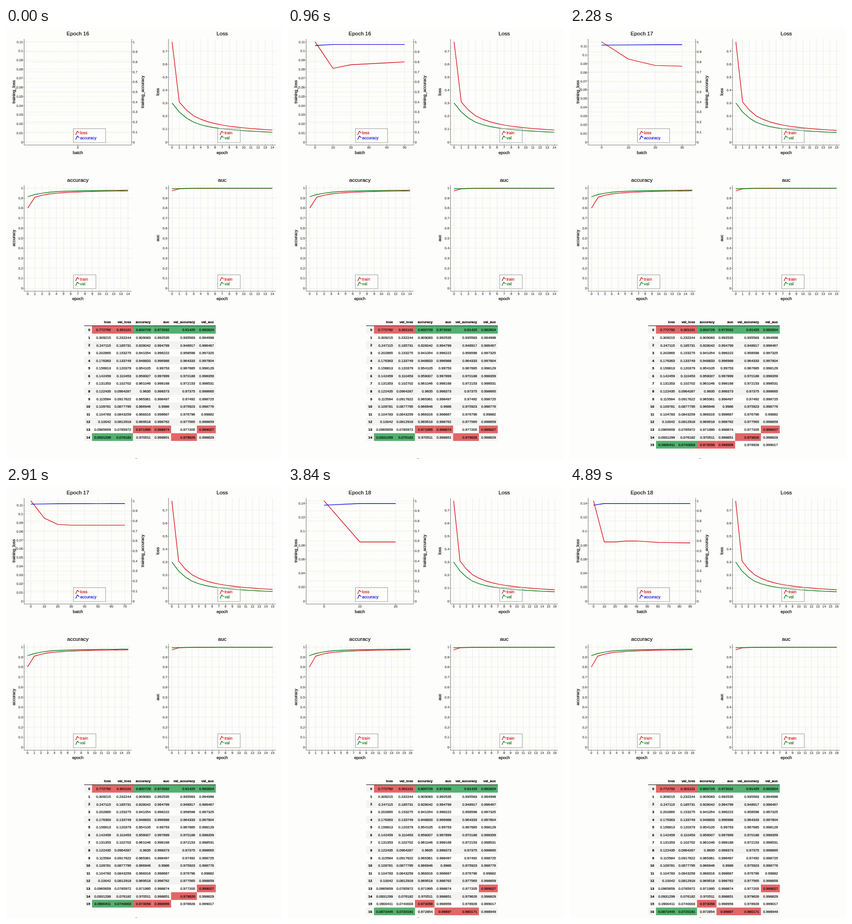
Recreate the animation shown at these times as an HTML page with a canvas. Size 600 by 933 pixels, loop 4920 ms.

```html
<!DOCTYPE html>
<html lang="en">
<head>
<meta charset="utf-8">
<title>Training monitor</title>
<style>
  html, body { margin: 0; width: 100%; height: 100%; overflow: hidden; background: #fdfdfb; }
  canvas { display: block; width: 600px; height: 933px; }
</style>
</head>
<body>
<canvas id="stage"></canvas>
<script>
const W = 600, H = 933, LOOP = 4920;
const FONT = '"Liberation Sans", Arial, sans-serif';
const RED = '#d81016', GREEN = '#0a780f', BLUE = '#0c0cd8', GREY = '#777';
const canvas = document.getElementById('stage');
const ctx = canvas.getContext('2d');
const dpr = window.devicePixelRatio || 1;
canvas.width = W * dpr;
canvas.height = H * dpr;

// Distance from the goal at epochs 0, 1, 2, 4, 8 and 16; power law in between.
// wobble: alternating noise in the late epochs
const METRICS = [
  { name: 'loss', goal: 0, right: 232, wobble: 0, keys: [.772792, .309215, .247115, .176363, .122435, .0872445] },
  { name: 'val_loss', goal: 0, right: 276, wobble: 0, keys: [.301101, .232244, .185731, .133749, .0964287, .0720161] },
  { name: 'accuracy', goal: 1, right: 318.5, wobble: .012, keys: [.199271, .090917, .071958, .051167, .0365, .026824] },
  { name: 'auc', goal: 1, right: 359, wobble: .01, keys: [.027968, .007465, .005201, .003012, .001627, .00102] },
  { name: 'val_accuracy', goal: 1, right: 415, wobble: -.012, keys: [.08575, .064417, .051083, .035667, .02625, .02007] },
  { name: 'val_auc', goal: 1, right: 456, wobble: .03, keys: [.007176, .005002, .003533, .002196, .001335, .00102] }
];

function metric({ goal, wobble, keys }, epoch) {
  const pos = epoch ? 1 + Math.log2(epoch) : 0;
  const i = Math.min(Math.floor(pos), keys.length - 2);
  let gap = keys[i] * (keys[i + 1] / keys[i]) ** (pos - i);
  if (epoch > 12) gap *= 1 + wobble * (17 - epoch) * (-1) ** epoch;
  return +Math.abs(goal - gap).toPrecision(6);
}

// first: time of the first batch, step: time between batches,
// loss: [batch, value] corners, acc: start, end and decay of the difference
const EPOCHS = [
  { id: 16, start: 0, first: 0, step: 165, tick: .01, acc: [.963, .9742, 0],
    loss: [[0, .11], [1, .0809], [2, .0849], [5, .088], [9, .0888]] },
  { id: 17, start: 1650, first: 1785, step: 150, tick: .01, acc: [.967, .9735, .6],
    loss: [[0, .1151], [1, .0953], [2, .088], [3, .0872], [9, .0872]] },
  { id: 18, start: 3270, first: 3420, step: 150, tick: .02, acc: [.957, .9735, 0],
    loss: [[0, .1435], [1, .0846], [2, .0846], [3.5, .0866], [6, .084], [9, .0833]] }
];

const range = (n, f) => Array.from({ length: n }, (_, i) => f(i));

function polyline(corners, x) {
  const i = Math.max(1, corners.findIndex(c => c[0] >= x));
  const [x0, y0] = corners[i - 1], [x1, y1] = corners[i];
  return y0 + (y1 - y0) * (x - x0) / (x1 - x0);
}

// Chart frame, with zero and the maximum inset vertically
const FW = 233.5, FH = 229.5, ZERO = 223.2, SPAN = 217;
const LEFT = 39.5, RIGHT = 353.3, UPPER = 23.8, LOWER = 340.3;

function line(points, color, width = 1, dash = []) {
  ctx.beginPath();
  points.forEach(([x, y]) => ctx.lineTo(x, y));
  ctx.strokeStyle = color;
  ctx.lineWidth = width;
  ctx.setLineDash(dash);
  ctx.stroke();
  ctx.setLineDash([]);
}

// A hairline outline gives the text slightly heavier strokes
function text(str, x, y, size, { align = 'center', color = '#000', bold = false, turn = false } = {}) {
  ctx.save();
  ctx.translate(x, y);
  if (turn) ctx.rotate(-Math.PI / 2);
  ctx.font = `${bold ? 'bold ' : ''}${size}px ${FONT}`;
  ctx.textAlign = align;
  ctx.fillStyle = ctx.strokeStyle = color;
  ctx.lineWidth = 0.2;
  ctx.fillText(str, 0, size * 0.35);
  ctx.strokeText(str, 0, size * 0.35);
  ctx.restore();
}

const ticks = (step, max) => range(Math.floor(max / step + 1e-6) + 1, i => i * step);
const plotY = (oy, v, max) => oy + ZERO - v / max * SPAN;
const plotX = (ox, i, n) => ox + FW * (i + 0.5) / n;

function yAxis(ox, oy, step, max, right) {
  const x = right ? ox + FW : ox, dir = right ? 1 : -1;
  for (let v = -step; v < max * 1.1; v += step / 5) {
    const y = plotY(oy, v, max);
    if (y > oy && y < oy + FH) line([[x, y], [x + dir * 1.5, y]], '#aaa', 0.6);
  }
  for (const v of ticks(step, max)) {
    const y = plotY(oy, v, max);
    line([[x - dir, y], [x + dir * 2.5, y]], GREY, 0.8);
    text(+v.toFixed(2), x + dir * 2.8, y, 7.2, { align: right ? 'left' : 'right', color: '#444' });
  }
}

function legend(x, y, width, items) {
  ctx.fillStyle = 'rgba(255,255,255,.25)';
  ctx.fillRect(x, y, width, 30.2);
  ctx.strokeStyle = '#a9a9a9';
  ctx.lineWidth = 1.2;
  ctx.strokeRect(x, y, width, 30.2);
  items.forEach(({ name, color }, i) => {
    const cy = y + 9.5 + i * 10.2;
    line([[x + 5, cy + 4], [x + 8.6, cy - 3.8], [x + 12.8, cy]], color, 1.4);
    text(name, x + 14.6, cy, 8.9, { align: 'left', color });
  });
}

function chart({ ox, oy, title, xName, yName, twin, n, unit, max, step, lines }) {
  const bottom = oy + FH, end = ox + FW;
  const across = (v, color, dash) => {
    const y = plotY(oy, v, max);
    line([[ox, y], [end, y]], color, 0.9, dash);
  };
  range(n, i => plotX(ox, i, n)).forEach(x => line([[x, oy], [x, bottom]], '#e9e9f6', 0.9));
  ticks(twin ? max / 10 : step, max).forEach(v => across(v, '#efefdd'));
  if (twin && n) ticks(step, max).forEach(v => across(v, '#ededea', [4, 3]));

  line([[ox, oy], [ox, bottom], [end, bottom]], GREY);
  if (twin) {
    line([[end, oy], [end, bottom]], GREY);
    yAxis(ox, oy, 0.1, 1, true);
    text(twin, ox + 257.3, oy + 114.5, 9, { turn: true });
  }
  text(title, ox + FW / 2, oy - 11.7, 11.6);
  text(xName, ox + FW / 2, oy + 245.9, 9);
  text(yName, ox - 23, oy + 114.5, 9, { turn: true });
  if (!n) return;

  yAxis(ox, oy, step, max, false);
  for (let i = 0; i < n; i++) {
    const x = plotX(ox, i, n);
    line([[x, bottom - 1], [x, bottom + 2.5]], GREY, 0.8);
    text(i * unit, x, oy + 235, 7.2, { color: '#444' });
  }
  for (const s of lines) {
    line(s.values.map((v, i) => [plotX(ox, i, n), plotY(oy, v, s.max || max)]), s.color, 1.4);
  }
  legend(ox + 107, oy + 194, twin ? 70 : 49, lines);
}

function batchChart(e, n) {
  const [from, to, decay] = e.acc;
  chart({
    ox: LEFT, oy: UPPER, title: 'Epoch ' + e.id, xName: 'batch', yName: 'training_loss',
    twin: 'training_accuracy', n, unit: 10, max: e.loss[0][1], step: e.tick,
    lines: [
      { name: 'loss', color: RED, values: range(n, k => polyline(e.loss, k)) },
      { name: 'accuracy', color: BLUE, max: 1, values: range(n, k => to + (from - to) * decay ** k) }
    ]
  });
}

function epochChart(ox, oy, title, train, val, max) {
  chart({
    ox, oy, title, yName: title.toLowerCase(), xName: 'epoch',
    n: train.length, unit: 1, max, step: 0.1,
    lines: [
      { name: 'train', color: RED, values: train },
      { name: 'val', color: GREEN, values: val }
    ]
  });
}

function table(columns, count) {
  const top = 645, rowH = 16.59, x0 = 170, x1 = 187, end = 456;
  const rowY = r => top + r * rowH;
  const textY = r => rowY(r + 0.52);
  for (let r = 0; r < count; r++) {
    ctx.fillStyle = '#f3f3f1';
    if (r % 2 === 0) ctx.fillRect(x0, rowY(r), end - x0, rowH);
    text(r, x1 - 4, textY(r), 7.6, { align: 'right', bold: true });
  }
  let left = x1;
  METRICS.forEach(({ name, right }, c) => {
    const values = columns[c];
    const high = Math.max(...values), low = Math.min(...values);
    text(name, right - 4, 636, 7.5, { align: 'right', bold: true });
    values.forEach((v, r) => {
      if (v === high || v === low) {
        ctx.fillStyle = v === high ? '#e26666' : '#52b06e';
        ctx.fillRect(left, rowY(r), right - left, rowH);
      }
      text(v, right - 4, textY(r), 7.7, { align: 'right' });
    });
    left = right;
  });
  line([[x0, 644.5], [end, 644.5]], '#111', 1.1);
}

function draw(t) {
  const e = EPOCHS.filter(p => p.start <= t).pop();
  const batches = Math.max(0, Math.min(10, Math.floor((t - e.first) / e.step) + 1));
  const count = e.id - 1;
  const columns = METRICS.map(m => range(count, i => metric(m, i)));
  const [loss, valLoss, acc, auc, valAcc, valAuc] = columns;

  ctx.setTransform(dpr, 0, 0, dpr, 0, 0);
  ctx.lineJoin = 'round';
  ctx.fillStyle = '#fdfdfb';
  ctx.fillRect(0, 0, W, H);

  batchChart(e, batches);
  epochChart(RIGHT, UPPER, 'Loss', loss, valLoss, loss[0]);
  epochChart(LEFT, LOWER, 'accuracy', acc, valAcc, 1);
  epochChart(RIGHT, LOWER, 'auc', auc, valAuc, 1);
  table(columns, count);

  ctx.fillStyle = '#888';
  ctx.fillRect(281, 932, 4, 1);
}

const begin = performance.now();
function tick() {
  draw((performance.now() - begin) % LOOP);
  requestAnimationFrame(tick);
}
tick();
</script>
</body>
</html>
```
